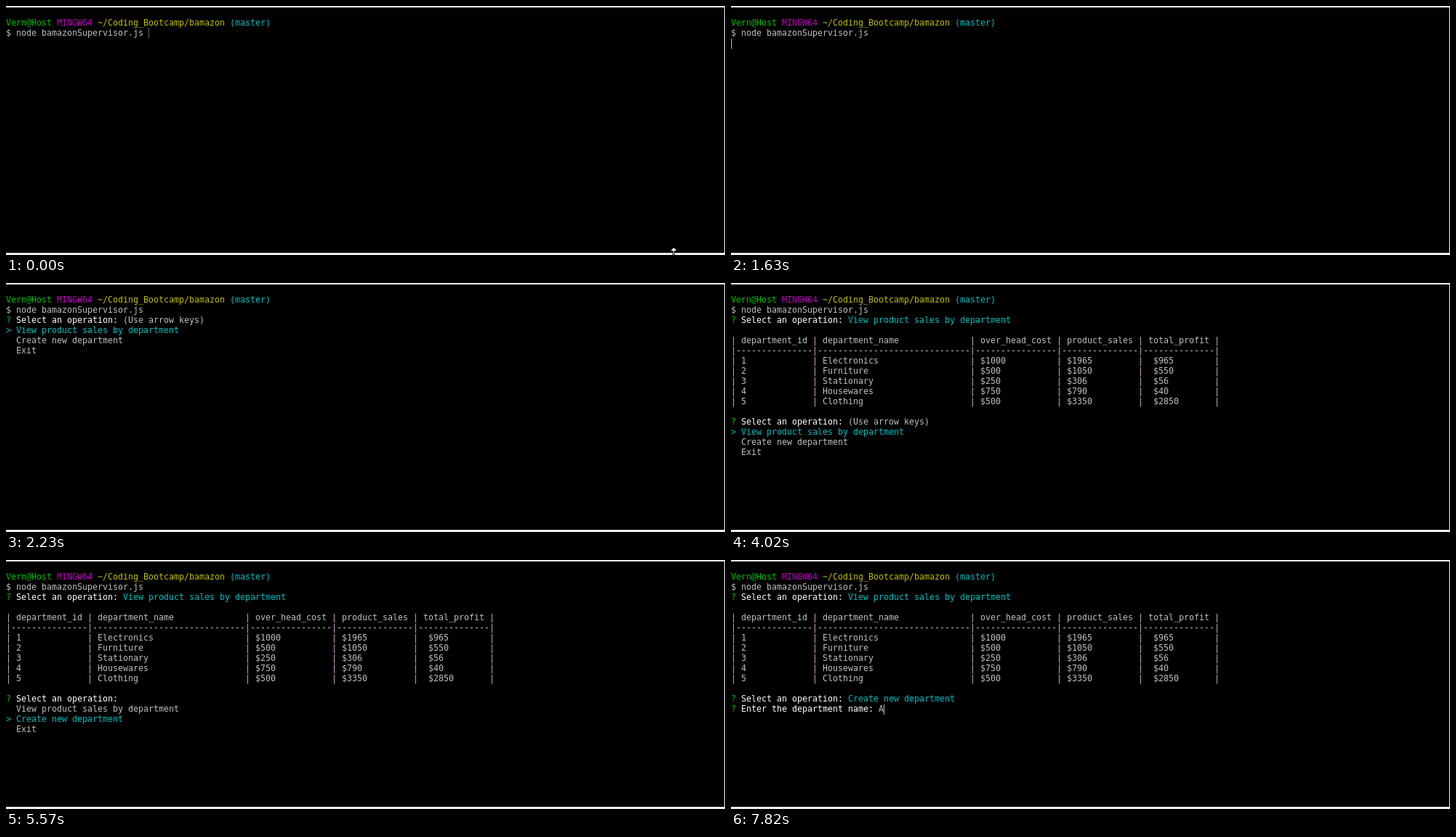
Recreate the animation shown at these times as an HTML page with a canvas. Size 989 px wide and 343 px high, loop 8 s.

```html
<!DOCTYPE html>
<html lang="en">
<head>
<meta charset="utf-8">
<title>Terminal session</title>
<style>
  html, body { margin: 0; width: 100%; height: 100%; overflow: hidden; background: #000; }
  canvas { display: block; }
</style>
</head>
<body>
<canvas id="stage" width="989" height="343"></canvas>
<script>
const ctx = document.getElementById('stage').getContext('2d');
const LOOP = 8000;
const CELL = 7, LINE = 14, TOP = 17, BASE = 10;
const GREY = '#bfbfbf', WHITE = '#fff', GREEN = '#00bf00', CYAN = '#00bfbf',
      YELLOW = '#bfbf00', MAGENTA = '#bf00bf', EDGE = '#f0f0f0';
const PINKISH = '#c9a3c9', GREENISH = '#9fbf9f';

const OPTIONS = ['View product sales by department', 'Create new department', 'Exit'];
const BARS = [0, 16, 47, 64, 80, 95];
const HEADER = ['department_id', 'department_name', 'over_head_cost', 'product_sales', 'total_profit'];
const ROWS = [
  ['1', 'Electronics', '$1000', '$1965', ' $965'],
  ['2', 'Furniture', '$500', '$1050', ' $550'],
  ['3', 'Stationary', '$250', '$306', ' $56'],
  ['4', 'Housewares', '$750', '$790', ' $40'],
  ['5', 'Clothing', '$500', '$3350', ' $2850']
];

// Every glyph sits on the terminal's character grid.
function put(row, col, text, color) {
  ctx.fillStyle = color;
  [...text].forEach((ch, i) => {
    if (ch !== ' ') ctx.fillText(ch, (col + i) * CELL, TOP + row * LINE + BASE);
  });
}

function line(row, ...parts) {
  let col = 0;
  for (const [text, color] of parts) {
    put(row, col, text, color);
    col += text.length;
  }
}

function question(row, text, answer = '', color = CYAN) {
  line(row, ['? ', GREEN], [text + ' ', WHITE], [answer, color]);
}

function menu(row, selected, hint) {
  question(row, 'Select an operation:', hint, GREY);
  OPTIONS.forEach((name, i) => {
    const on = i === selected;
    line(row + 1 + i, [(on ? '> ' : '  ') + name, on ? CYAN : GREY]);
  });
}

function bars(row) {
  BARS.forEach((col, i) => put(row, col, '|', i === 2 || i === 5 ? GREENISH : PINKISH));
}

function table(row) {
  const cells = (r, values) => {
    bars(r);
    values.forEach((v, i) => put(r, BARS[i] + 2, v, GREY));
  };
  cells(row, HEADER);
  bars(row + 1);
  HEADER.forEach((_, i) => put(row + 1, BARS[i] + 1, '-'.repeat(BARS[i + 1] - BARS[i] - 1), GREY));
  ROWS.forEach((values, i) => cells(row + 2 + i, values));
}

function caret(row, col, dotted) {
  const x = col * CELL, y = TOP + row * LINE;
  ctx.fillStyle = GREY;
  if (!dotted) return ctx.fillRect(x, y, 1, LINE);
  for (let d = 0; d < LINE; d += 2) ctx.fillRect(x, y + d, 1, 1);
}

function resizeArrow(x, y) {
  const shape = (color, pad) => {
    ctx.fillStyle = color;
    for (let i = 0; i < 4; i++) ctx.fillRect(x - i - pad, y + i - pad, 2 * i + 1 + 2 * pad, 1 + pad);
    ctx.fillRect(x - pad, y + 4, 1 + 2 * pad, 12);
  };
  shape('#000', 1);
  shape(WHITE, 0);
}

function textPointer(x, y) {
  ctx.fillStyle = WHITE;
  for (const dy of [0, 15]) {
    ctx.fillRect(x - 3, y + dy, 3, 1);
    ctx.fillRect(x + 1, y + dy, 3, 1);
  }
  ctx.fillRect(x, y + 1, 1, 14);
}

function pointer(t) {
  if (t < 70) resizeArrow(918, 333);
  else if (t < 140) textPointer(934, 323);
  else if (t < 300) textPointer(949, 320);
  else if (t < 460) textPointer(955, 323);
}

function screen(t) {
  line(0, ['Vern@Host ', GREEN], ['MINGW64 ', MAGENTA],
          ['~/Coding_Bootcamp/bamazon ', YELLOW], ['(master)', CYAN]);
  line(1, ['$ node bamazonSupervisor.js', GREY]);

  if (t < 1630) {
    if (t < 850 || t >= 1390) caret(1, 28, t < 380);
    return;
  }
  if (t < 2230) return caret(2, 0);
  if (t < 3940) return menu(2, 0, '(Use arrow keys)');

  question(2, 'Select an operation:', OPTIONS[0]);
  if (t < 4020) return caret(3, 0);

  table(4);
  if (t < 5570) return menu(12, 0, '(Use arrow keys)');
  if (t < 7670) return menu(12, 1, '');

  const typed = t < 7820 ? '' : 'A';
  question(12, 'Select an operation:', OPTIONS[1]);
  question(13, 'Enter the department name:', typed, GREY);
  caret(13, 29 + typed.length);
}

function draw(t) {
  ctx.fillStyle = '#000';
  ctx.fillRect(0, 0, 989, 343);
  ctx.fillStyle = EDGE;
  ctx.fillRect(0, 0, 989, 2);
  ctx.fillRect(0, 340, 989, 3);
  ctx.fillRect(988, 0, 1, 343);
  ctx.font = '11.63px "DejaVu Sans Mono", monospace';
  ctx.textBaseline = 'alphabetic';
  screen(t);
  pointer(t);
}

const start = performance.now();
function tick() {
  draw((performance.now() - start) % LOOP);
  requestAnimationFrame(tick);
}
tick();
</script>
</body>
</html>
```
